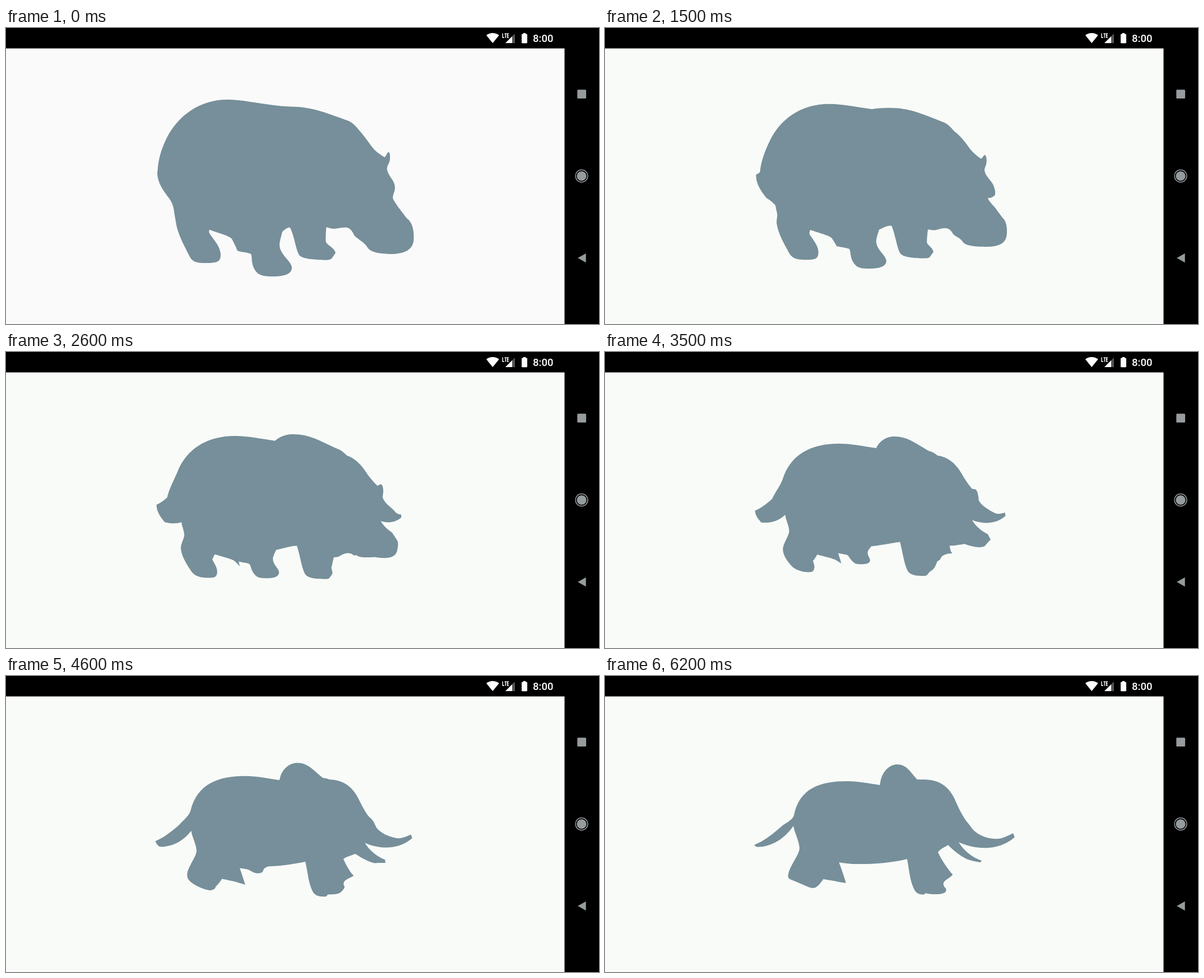
An HTML page that plays this animation: 1058 by 529 pixels, repeating every 7200 ms.

```html
<!DOCTYPE html>
<html lang="en">
<head>
<meta charset="utf-8">
<title>Hippo to elephant morph</title>
<style>
  html, body { margin: 0; width: 100%; height: 100%; overflow: hidden; background: #000; }
  svg { display: block; width: 100%; height: 100%; }
  .clock { font: 500 18.5px Roboto, sans-serif; fill: #fff; }
  .page { animation: tint 7.2s step-end infinite; }
  @keyframes tint { 0% { fill: #fafafa; } 12.5%, 100% { fill: #f9fbf8; } }
</style>
</head>
<body>
<svg viewBox="0 0 1058 529">
  <rect width="1058" height="529"/>
  <rect class="page" y="36.5" width="996.5" height="492.5"/>
  <path id="animal" fill="#768f9a"/>

  <g fill="#fff">
    <path d="M868.3 27L857 13Q862 9 868.3 9T879.7 13Z"/>
    <path d="M908 10V27H891Z" fill="#555"/>
    <path d="M903 15V27H891Z"/>
    <path d="M886 9.5V17H889M889.5 10.2H893.5M891.5 10V17.7M897 10.2H894.7V17H897M895 13.5H896.8" fill="none" stroke="#fff" stroke-width="1.4"/>
    <path d="M920 11.8Q920 10.8 921 10.8H922.7V9H927.3V10.8H929Q930 10.8 930 11.8V26.3Q930 27.3 929 27.3H921Q920 27.3 920 26.3Z"/>
  </g>
  <text class="clock" x="940" y="25.3">8:00</text>

  <g fill="#969c9e">
    <rect x="1019.3" y="110.3" width="15.8" height="15.8" rx="1.5"/>
    <circle cx="1027" cy="264.5" r="8.6"/>
    <circle cx="1027" cy="264.5" r="11" fill="none" stroke="#969c9e" stroke-width="1.5"/>
    <path d="M1020.2 411L1034.7 402.8V419.2Z"/>
  </g>
</svg>
<script>
const LOOP = 7200, STEP = 100, DELAY = 70, MORPH = 6100;

// Each body part: hippo outline, then the elephant outline it becomes.
const parts = {
  tail: [
    `M270.5 256 C270.5 256 270 256 270 256 C269 276 282 292 290 303
     C294 308 298 315 299.5 325`,
    `M317 267 C300 282 284 295 266 302 C267 303 269 304.5 271 305.5
     C294 306 319 293 336 268`],
  hindLeg: [
    `L300 329 C300.5 332 301 334 301.3 337 C302 340 302.5 343 303 347
     C306 368 319 391 327 407 C332 418 340 420 355 420 C378 420 383 418 383 404
     C382 390 371 379 363 367 C362 365 362 362 363 360.5
     C376 366 399 371 403 377 L409.5 390`,
    `L338 276 C341 285 347 299 347 308 C347 319 329 340 327 355
     C325 362 331 364 337 366 C344 369 351 372 358 375 C360 376 363 377.3 366 378
     C370 379.5 374 379 376.5 377.5 C382 374 386 368 389.5 363
     C398 364.5 408 366 417 368 L430 370`],
  belly: [
    `C412 396 412 397.5 414 398.5 C421 401 432 401 437 404
     C440 408 436 422 446 435 C452 443 462 444 476 444 C499 444 510 439 510 428
     C509 416 488 405 488 387 C489 377 491 373 493 364 C499 359 505 354 507.5 358`,
    `C427 360 422 345 417.5 333 C421 333.5 424 334 428 334.5
     C433 335 437 335.7 442 336 C442.6 336 443.3 336 444 336 C445 336 446 336 448 336
     C450 336 453 336 456 336 C458 336 460 336 463 336 C490 336 520 332 539 327`],
  frontLeg: [
    `C514 372 517 394 522 404 C525 411 540 413 555 414 C564 414.5 577 416 581 412
     L588 402 C586 393 576 390 571 383 C570 379 570.5 366 571.5 356
     C576 357 581 359.3 587 358.7 C604 357 612 352 620 368 C622 375 640 382 645 392.5`,
    `C543 349 544 365 551 380 C555 389 561 390.5 568 390.5 C569 390.5 570 390.5 570 390
     L572 388 C578 390.3 590 390.3 597 389.8 C601 389.5 605 388 607 386.5
     C610 383 608.5 379.5 606 377.5 C598 366 613 364 620.5 355 C612 346 600 328 594 315`],
  jaw: [
    `C652 402 668 403 684 404 C712 404 728 396 727.5 375
     C728 355 722 345 715 340 L699 319 C696 314 692 309 690.5 305`,
    `C598 309 606 306 612 302 C622 312 633 321 645 327
     C653 330 661 332 670 333 L672 330 C655 324 640 312 631 297`],
  trunk: [
    `C690 303 690 301.5 690.5 300 L691.5 296 C693 293 694 289 694 285
     C694 271 678 262 680 249 C682 242 686 240 685 228
     C685 223 683 221 681.5 222 C679 225 678 229 675.5 231`,
    `C662 311 703 313 731 288 L728 281 C718 286 708 291 699 291
     C682 291 668 285 658 276 C656 274 653 270 651 267
     C649 265 648 263 646 261 C644 258 642 256 640.5 253`],
  head: [
    `C669 227 660 221 655 215 C648 206 640 194 632 185 C623 174 618 169 611 166
     C565 149 543 141 508 140.5 C496 140 485 139 474 137.5`,
    `C634 243 628 229 623 218 C613 198 596 184 567 185 C564 185 560 185 557 185
     C545 172 538 158 522 158 C506 158 492 173 490.5 195`],
  back: [
    `C445 134 420 128 395 128 C345 128 307 157 287 196 C277 216 271 237 270.5 256Z`,
    `C472 192 452 188 432 188 C384 188 347 200 337 249 C336 256 324 262 317 267Z`]
};

const NUMBER = /[\d.]+/g;
const animal = document.getElementById('animal');

function blend([from, to], amount) {
  const ends = to.match(NUMBER);
  let i = 0;
  return from.replace(NUMBER, n => (+n + (ends[i++] - n) * amount).toFixed(2));
}

function draw(time) {
  const tick = Math.floor(time % LOOP / STEP) * STEP;
  const progress = Math.min(1, Math.max(0, (tick - DELAY) / MORPH));
  const eased = (1 - Math.cos(Math.PI * progress)) / 2;
  animal.setAttribute('d', Object.values(parts).map(part => blend(part, eased)).join(' '));
}

const start = performance.now();
function frame() {
  draw(performance.now() - start);
  requestAnimationFrame(frame);
}
frame();
</script>
</body>
</html>
```
